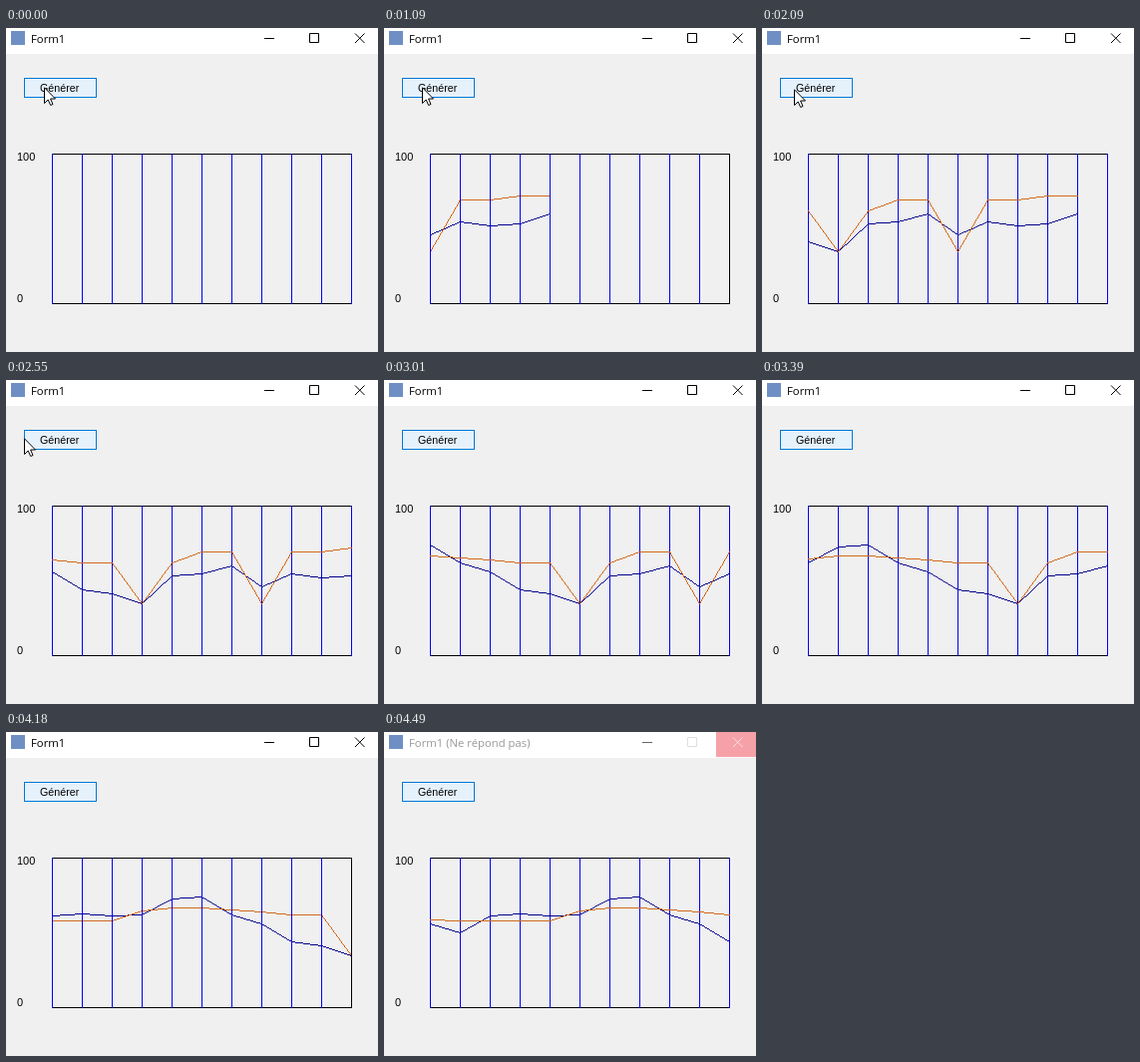
An HTML page with a canvas for the animation above (4.57 s loop, 373 by 325 pixels).

```html
<!DOCTYPE html>
<html lang="fr">
<head>
<meta charset="utf-8">
<title>Form1</title>
<style>
  html, body { margin: 0; width: 100%; height: 100%; overflow: hidden; background: #f0f0f0; }
  canvas, svg { position: absolute; left: 0; top: 0; display: block; }
  text { font: 11px "Liberation Sans", Arial, sans-serif; fill: #000; }
  .title { font: 11.3px "Open Sans", "Noto Sans", sans-serif; }
  .glyph { fill: none; stroke: #000; }
  .hung .title { fill: #999; }
  .hung .min { stroke: #666; }
  .hung .max { stroke: #dedede; }
  .hung .close { stroke: #fbdcdf; }
  .alert { fill: #f6a1a8; visibility: hidden; }
  .hung .alert { visibility: visible; }
</style>
</head>
<body>
<canvas id="chart" width="373" height="325"></canvas>
<svg id="form" width="373" height="325" viewBox="0 0 373 325">
  <rect width="373" height="26" fill="#fff"/>
  <rect x="5" y="3" width="14" height="14" fill="#6f8fc4"/>
  <text id="caption" class="title" x="25" y="15">Form1</text>
  <rect class="alert" x="333" width="40" height="25"/>
  <path class="glyph min" d="M259 10.5h10"/>
  <path class="glyph max" d="M304.5 5.5h9v9h-9z"/>
  <path class="glyph close" d="M350 5.500l9.500 9.500M359.500 5.500l-9.500 9.500"/>
  <rect x="18.5" y="50.5" width="72" height="19" fill="#e5f1fb" stroke="#0078d7"/>
  <text x="34" y="64" style="font-size:10.7px">Générer</text>
  <text x="11" y="133">100</text>
  <text x="11" y="275">0</text>
  <path id="cursor" fill="#fff" stroke="#000" d="M.5 .8V16.500L4.200 13L6.700 18.500L9 17.500L6.600 12H11.500Z"/>
</svg>
<script>
const LOOP = 4570, HUNG_AT = 4490;
const LEFT = 46, TOP = 126, STEP = 30, COLUMNS = 10, HEIGHT = 150;
const RIGHT = LEFT + STEP * COLUMNS;

// One sample of each series arrives at each time, heights in stage pixels
const arrivals = [0, 230, 460, 690, 920, 1170, 1400, 1630, 1860, 2090, 2320,
  2550, 2780, 3010, 3240, 3390, 3620, 3770, 4010, 4250, 4490];
const navy = [186, 196, 198, 194, 207, 186, 194, 196, 224, 214, 210,
  192, 183, 165, 167, 183, 184, 182, 184, 201, 192];
const orange = [168, 168, 172, 172, 224, 172, 172, 183, 224, 183, 183,
  180, 178, 176, 176, 179, 189, 189, 189, 189, 188];

// Moments when the grid is repainted ahead of the curves
const repaints = [1090, 1320, 1550, 1780, 3160, 3540, 3940, 4180, 4420];
const FULL_REPAINT = 1550;

// time, x, y of the pointer; it leaves the window at the end
const pointer = [[0, 38, 59], [1470, 32, 61], [2390, 27, 60], [2470, 18, 58],
  [2620, 2, 56], [2700, -40, 56]];

const ctx = document.getElementById('chart').getContext('2d');
const form = document.getElementById('form');
const caption = document.getElementById('caption');
const cursor = document.getElementById('cursor');
const lastBefore = (list, t) => list.filter(v => v <= t).pop() ?? -1;

function line(x0, y0, x1, y1) {
  const n = Math.max(Math.abs(x1 - x0), Math.abs(y1 - y0));
  for (let i = 0; i <= n; i++) {
    ctx.fillRect(Math.round(x0 + (x1 - x0) * i / n), Math.round(y0 + (y1 - y0) * i / n), 1, 1);
  }
}

function drawBox() {
  ctx.fillStyle = '#000';
  ctx.fillRect(LEFT, TOP, RIGHT - LEFT + 1, 1);
  ctx.fillRect(LEFT, TOP + HEIGHT, RIGHT - LEFT + 1, 1);
  ctx.fillRect(RIGHT, TOP, 1, HEIGHT + 1);
}

function drawGrid(count) {
  ctx.fillStyle = '#00f';
  for (let i = 0; i < count; i++) ctx.fillRect(LEFT + i * STEP, TOP, 1, HEIGHT + 1);
}

function drawSeries(values, count, color) {
  const shown = values.slice(0, count).reverse().slice(0, COLUMNS + 1);
  ctx.fillStyle = color;
  for (let i = 1; i < shown.length; i++) {
    line(LEFT + (i - 1) * STEP, shown[i - 1], LEFT + i * STEP, shown[i]);
  }
}

function drawChart(t) {
  const count = arrivals.filter(v => v <= t).length;
  const repaint = lastBefore(repaints, t);
  const repainting = repaint > lastBefore(arrivals, t);
  const columns = repainting && repaint !== FULL_REPAINT ? COLUMNS : COLUMNS + 1;
  ctx.clearRect(0, 0, 373, 325);
  drawBox();
  drawGrid(columns);
  drawSeries(navy, count, '#00008b');
  drawSeries(orange, count, '#d2691e');
  if (repainting) {
    drawBox();
    drawGrid(columns);
  }
}

function render() {
  const t = performance.now() % LOOP;
  drawChart(t);
  const [, x, y] = pointer.filter(p => p[0] <= t).pop();
  cursor.setAttribute('transform', `translate(${x} ${y})`);
  const hung = t >= HUNG_AT;
  form.classList.toggle('hung', hung);
  caption.textContent = hung ? 'Form1 (Ne répond pas)' : 'Form1';
  requestAnimationFrame(render);
}
render();
</script>
</body>
</html>
```
